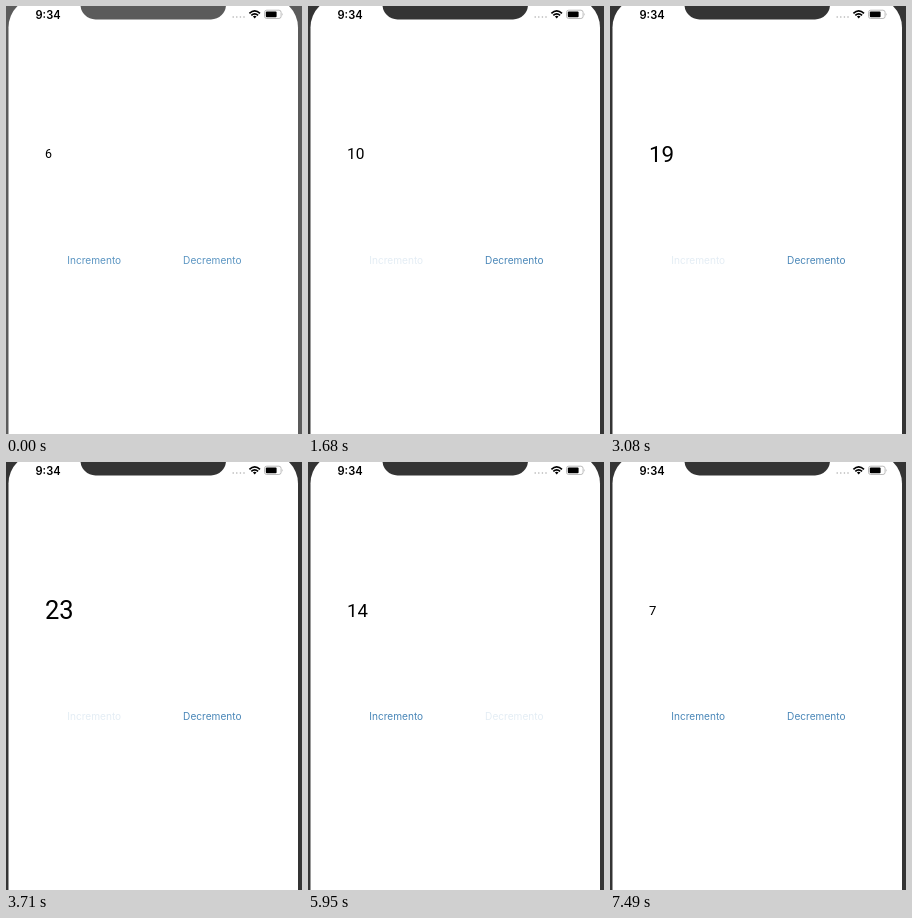
An HTML page for the animation above (7560 ms loop, 296 px wide and 428 px high).

```html
<!DOCTYPE html>
<html lang="it">
<head>
<meta charset="utf-8">
<title>Contatore</title>
<style>
  html, body { margin: 0; width: 100%; height: 100%; overflow: hidden; background: #fff; }
  svg { display: block; width: 296px; height: 428px; --bezel: #343434; --tint: #4a87b8; }
  svg.inactive { --bezel: #5b5b5b; --tint: #5b95c2; }
  .bezel { fill: var(--bezel); }
  .clock { font: 600 11.1px Inter, "Noto Sans", sans-serif; }
  .button { font: 10.1px Inter, "Noto Sans", sans-serif; fill: var(--tint); text-anchor: middle; }
  #count { font-family: Roboto, "Liberation Sans", sans-serif; }
</style>
</head>
<body>
<svg id="stage" viewBox="0 0 296 428">
  <rect class="bezel" width="296" height="428"/>
  <rect x="2.5" y="-8.5" width="289.5" height="480" rx="30" fill="#fff"/>
  <rect class="bezel" x="74.5" y="-30" width="145.5" height="43.5" rx="15"/>

  <text class="clock" x="29.5" y="12.5">9:34</text>
  <g fill="#b0b0b0">
    <circle cx="227.2" cy="11" r=".8"/>
    <circle cx="230.8" cy="11" r=".8"/>
    <circle cx="234.4" cy="11" r=".8"/>
    <circle cx="238" cy="11" r=".8"/>
  </g>
  <g fill="none" stroke="#000" stroke-width="1.7">
    <path d="M243.4 7.3Q248.7 2.5 254 7.3"/>
    <path d="M245.3 9.3Q248.7 6.3 252.1 9.3"/>
  </g>
  <path d="M246.9 10.6Q248.7 9.1 250.5 10.6L248.7 12.5Z"/>
  <rect x="258.5" y="4.2" width="16.6" height="8.3" rx="2.2" fill="none" stroke="#aaa" stroke-width=".8"/>
  <rect x="259.8" y="5.5" width="10.8" height="5.7" rx="1"/>
  <path d="M276 7Q277.2 8.3 276 9.7Z" fill="#aaa"/>

  <text id="count" x="39"></text>
  <text id="inc" class="button" x="88.2" y="257.6">Incremento</text>
  <text id="dec" class="button" x="206.3" y="257.6">Decremento</text>
</svg>
<script>
const LOOP = 7560, TICK = 70, FOCUS = 420;
const SCALE = 0.773;            // screen pixels per point
const PRESSED = 0.15, FADE = 420;

// Times at which a tap is released
const ups = [560, 1400, 1540, 1680, 1820, 1960, 2100, 2240, 2450, 2590, 2730,
  2870, 3080, 3220, 3360, 3570, 3710, 3920];
const downs = [4480, 4690, 4830, 4970, 5110, 5320, 5460, 5600, 5810, 5950,
  6160, 6300, 6440, 6580, 6790, 6930, 7070];

// Runs of quick tapping: [first press, last release]
const incRuns = [[420, 560], [1260, 3920]];
const decRuns = [[4340, 7070]];

const $ = id => document.getElementById(id);
const stage = $("stage"), count = $("count"), inc = $("inc"), dec = $("dec");

const passed = (taps, t) => taps.filter(tap => tap <= t).length;

function opacity(runs, t) {
  const run = runs.filter(([start]) => start <= t).pop();
  if (!run) return 1;
  const k = Math.min(1, Math.max(0, (t - run[1]) / FADE));
  return PRESSED + (1 - PRESSED) * k * k * (3 - 2 * k);
}

function draw(now) {
  const t = Math.floor(now % LOOP / TICK) * TICK;
  const n = 6 + passed(ups, t) - passed(downs, t);
  const size = (n + 10) * SCALE;
  stage.classList.toggle("inactive", t < FOCUS);
  count.textContent = n;
  count.setAttribute("font-size", size);
  count.setAttribute("y", 148 + size * 0.355);
  inc.setAttribute("opacity", opacity(incRuns, t));
  dec.setAttribute("opacity", opacity(decRuns, t));
}

const began = performance.now();
function loop() {
  draw(performance.now() - began);
  requestAnimationFrame(loop);
}
loop();
</script>
</body>
</html>
```
